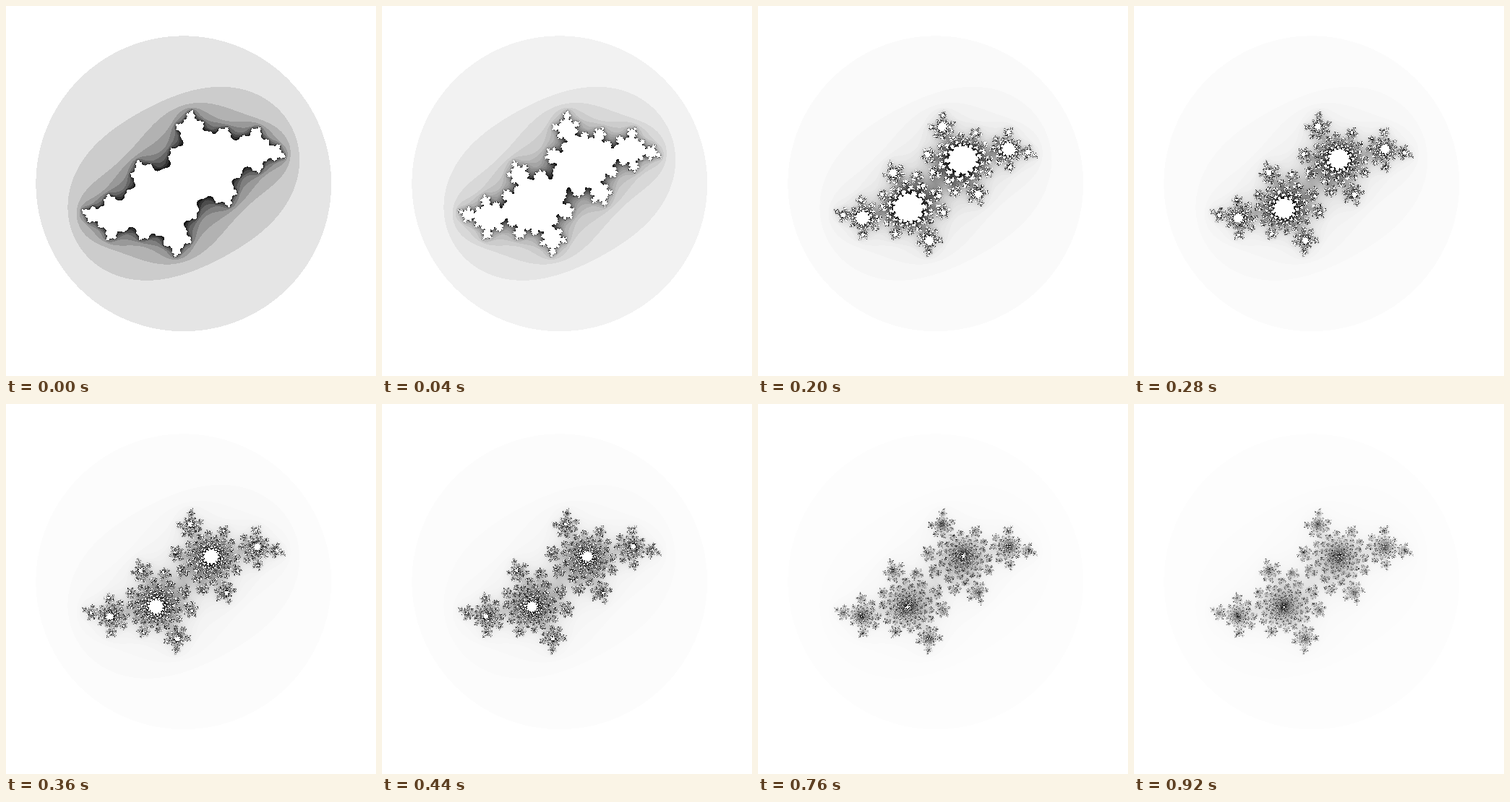
An HTML page with a canvas for the animation above (0.96 s loop, 512x512 px).

```html
<!DOCTYPE html>
<html lang="en">
<head>
<meta charset="utf-8">
<title>Julia set, growing iteration limit</title>
<style>
  html, body { margin: 0; width: 100%; height: 100%; overflow: hidden; background: #fff; }
  canvas { display: block; width: 512px; height: 512px; }
</style>
</head>
<body>
<canvas id="view" width="512" height="512"></canvas>
<script>
const SIZE = 512, STEPS = 24, STEP_MS = 40, ITER_STEP = 10;
const MAX_ITER = STEPS * ITER_STEP;
const MIN = -2.4, SPAN = 5;
const CX = -0.4, CY = 0.6;

const ctx = document.getElementById('view').getContext('2d');
const image = ctx.createImageData(SIZE, SIZE);
const pixels = new Uint32Array(image.data.buffer);

function escapeTime(x, y) {
  for (let k = 0; k < MAX_ITER; k++) {
    const xx = x * x, yy = y * y;
    if (xx + yy > 4) return k;
    y = 2 * x * y + CY;
    x = xx - yy + CX;
  }
  return MAX_ITER;
}

const coord = i => MIN + SPAN * i / (SIZE - 1);
const counts = new Uint8Array(SIZE * SIZE);
for (let row = 0, p = 0; row < SIZE; row++) {
  for (let col = 0; col < SIZE; col++) counts[p++] = escapeTime(coord(col), coord(row));
}

// Escaped points darken with their count; points still inside stay white.
function shades(limit) {
  return Uint32Array.from({ length: MAX_ITER + 1 }, (_, k) => {
    const g = k < limit ? Math.floor(255 * (limit - k) / limit) : 255;
    return 0xff000000 | g << 16 | g << 8 | g;
  });
}

let shown = -1;
function draw(time) {
  const step = Math.floor(time / STEP_MS) % STEPS;
  if (step === shown) return;
  shown = step;
  const shade = shades((step + 1) * ITER_STEP);
  for (let p = 0; p < pixels.length; p++) pixels[p] = shade[counts[p]];
  ctx.putImageData(image, 0, 0);
}

function tick() {
  draw(performance.now());
  requestAnimationFrame(tick);
}
tick();
</script>
</body>
</html>
```
